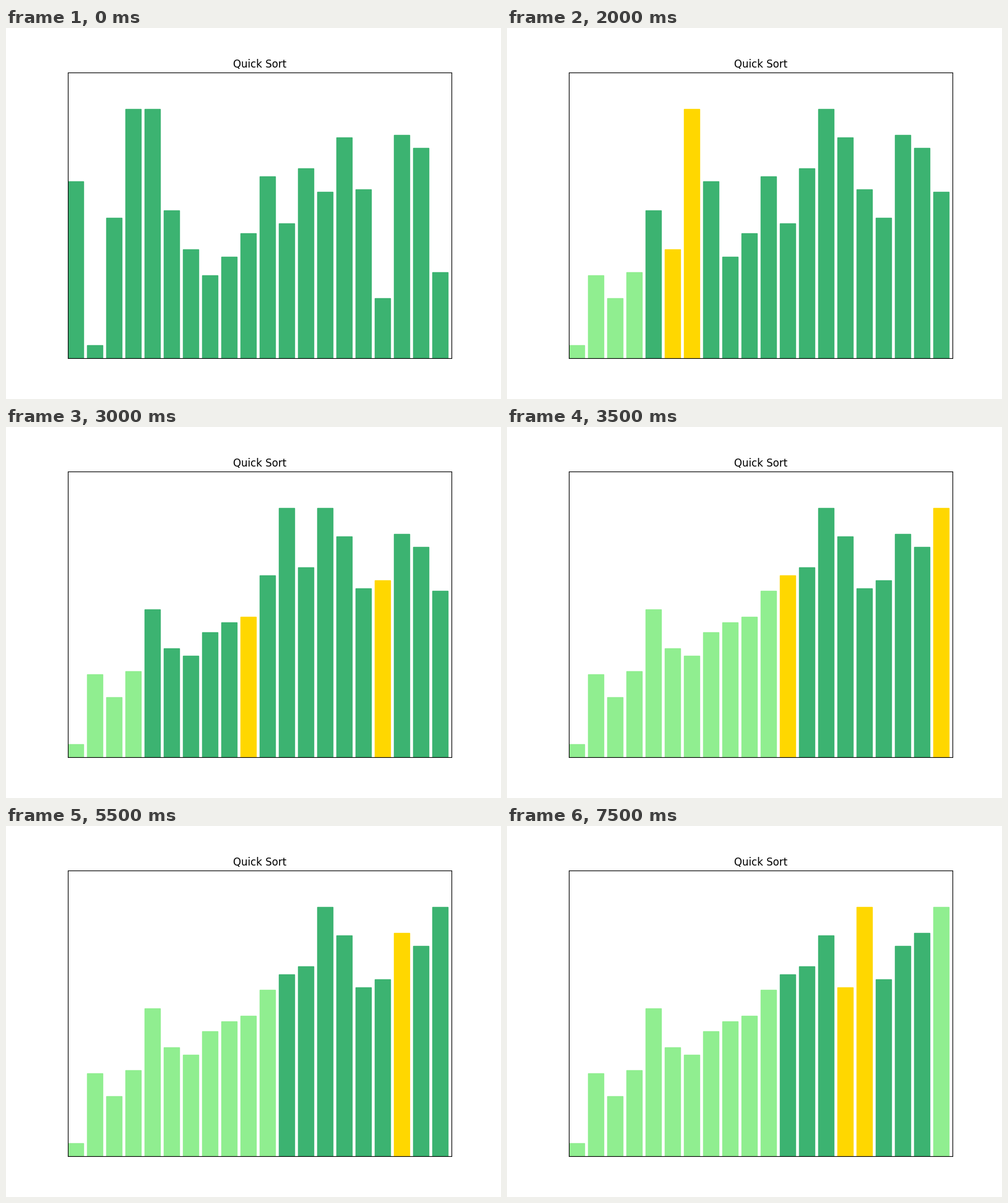
Recreate the animation shown at these times as a matplotlib script. Size 800 px wide and 600 px high, loop 8 s.

```python
from itertools import islice

import matplotlib.pyplot as plt
from matplotlib.animation import FuncAnimation

VALUES = [68, 5, 54, 96, 96, 57, 42, 32, 39, 48,
          70, 52, 73, 64, 85, 65, 23, 86, 81, 33]
PIVOTS = [19, 13, 11, 17]  # pivot position picked for each partition
FRAMES = 16
IDLE, ACTIVE, SWAPPED = "lightgreen", "mediumseagreen", "gold"


def quick_sort(values, pivots):
    """Yield (values, low, high, swapped positions) after every step."""
    a = list(values)
    stack = [(0, len(a) - 1)]
    picks = iter(pivots)

    def swap(i, j):
        a[i], a[j] = a[j], a[i]
        return a[:], low, high, (i, j)

    while stack:
        low, high = stack.pop()
        yield swap(next(picks), high)
        yield a[:], low, high, ()
        split = low
        for j in range(low, high):
            if a[j] <= a[high]:
                yield swap(split, j)
                split += 1
        yield swap(split, high)
        if split - 1 > low:
            stack.append((low, split - 1))
        if split + 1 < high:
            stack.append((split + 1, high))


# Every second step is shown, starting just after the first pivot is set.
steps = list(islice(quick_sort(VALUES, PIVOTS), 1, 2 * FRAMES, 2))

fig, ax = plt.subplots(figsize=(8, 6), dpi=100)
ax.set_title("Quick Sort")
bars = ax.bar(range(len(VALUES)), VALUES, align="edge")
ax.set(xlim=(0, len(VALUES)), ylim=(0, 110), xticks=[], yticks=[])


def draw(frame):
    values, low, high, swapped = steps[frame]
    for k, (bar, value) in enumerate(zip(bars, values)):
        bar.set_height(value)
        if k in swapped:
            bar.set_color(SWAPPED)
        else:
            bar.set_color(ACTIVE if low <= k <= high else IDLE)
    return list(bars)


anim = FuncAnimation(fig, draw, frames=FRAMES, interval=500,
                     repeat=True, repeat_delay=0)
plt.show()
```
